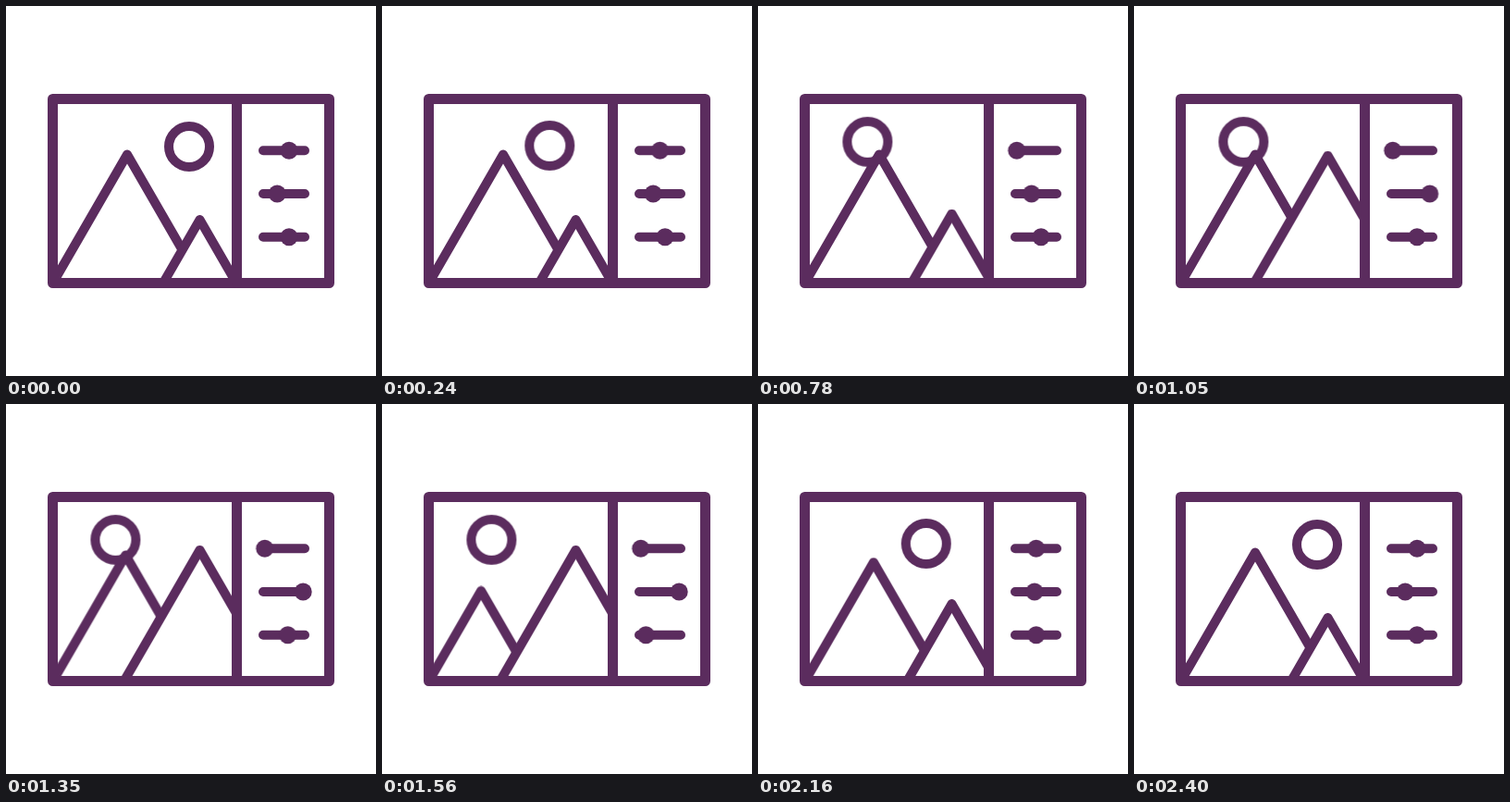
Write an HTML page that moves like this. It is 400 by 400 pixels and loops after 4430 ms.

```html
<!DOCTYPE html>
<html lang="en">
<head>
<meta charset="utf-8">
<title>Image settings icon</title>
<style>
  html, body { margin: 0; width: 100%; height: 100%; overflow: hidden; background: #fff; }
  svg { display: block; width: 100%; height: 100%; }

  .ink { fill: none; stroke: #5b2c5e; stroke-width: 10; stroke-linecap: round; stroke-linejoin: round; }
  .frame { stroke-width: 11; }
  .hill { fill: #fff; }
  .knob { fill: #5b2c5e; stroke: none; }

  /* Each control moves in its own 600 ms slot, then all return together. */
  .first, .second, .third {
    animation: first 4430ms cubic-bezier(.75, 0, .25, 1) infinite;
  }
  .second { animation-name: second; }
  .third { animation-name: third; }

  @keyframes first {
    0%, 54.176%, 100% { transform: none; }
    13.544%, 40.632% { transform: translate(var(--dx), var(--dy)); }
  }
  @keyframes second {
    0%, 13.544%, 54.176%, 100% { transform: none; }
    27.088%, 40.632% { transform: translate(var(--dx), var(--dy)); }
  }
  @keyframes third {
    0%, 27.088%, 54.176%, 100% { transform: none; }
    40.632% { transform: translate(var(--dx), var(--dy)); }
  }

  .sun { --dx: -79.6px; --dy: -5.2px; }
  .near { --dx: 0px; --dy: -73.3px; }
  .far { --dx: -30px; --dy: 52px; }
  .k1 { --dx: -26.3px; --dy: 0px; }
  .k2 { --dx: 28px; --dy: 0px; }
  .k3 { --dx: -26px; --dy: 0px; }
</style>
</head>
<body>
<svg viewBox="0 0 400 400">
  <clipPath id="view"><rect x="50" y="100" width="200" height="200"/></clipPath>

  <g class="ink" clip-path="url(#view)">
    <path class="hill far third" d="M15.5 360.5 L131 160.5 L246.5 360.5"/>
    <path class="hill near second" d="M94 431 L209.5 231 L325 431"/>
    <circle class="sun first" cx="198" cy="152" r="22"/>
  </g>

  <g class="ink frame">
    <rect x="50.5" y="100.5" width="299" height="199"/>
    <path d="M249.5 100.5V299.5"/>
  </g>

  <path class="ink" d="M278 156.3H323M278 203H323M278 249.8H323"/>
  <circle class="knob k1 first" cx="306" cy="156.3" r="9.5"/>
  <circle class="knob k2 second" cx="293.2" cy="203" r="9.5"/>
  <circle class="knob k3 third" cx="306" cy="249.8" r="9.5"/>
</svg>
</body>
</html>
```
